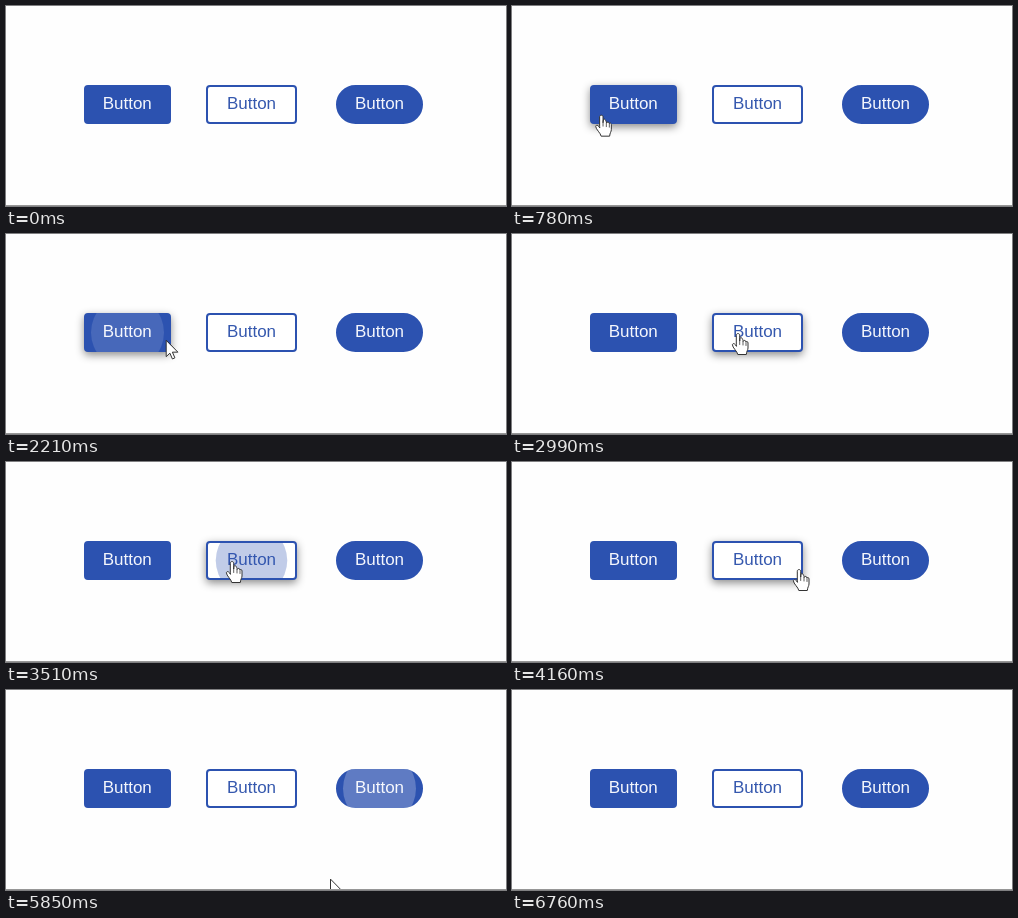
An HTML page for the animation above (7020 ms loop, 500 by 200 pixels).

```html
<!DOCTYPE html>
<html lang="en">
<head>
<meta charset="utf-8">
<title>Buttons</title>
<style>
  html, body { margin: 0; width: 100%; height: 100%; overflow: hidden; background: #fefefe; }
  #stage { position: relative; width: 500px; height: 200px; overflow: hidden; }
  #stage::after {
    content: ""; position: absolute; left: 0; top: 199px; width: 500px; height: 1px; background: #969696;
  }
  .btn {
    position: absolute; top: 79px; height: 38.5px; box-sizing: border-box;
    border: 2px solid #2c52b0; border-radius: 4px; background: #2c52b0; color: #f4f6fc;
    font: 17px/34.5px "Liberation Sans", Arial, sans-serif; text-align: center;
    --ripple: #fff;
  }
  .solid { left: 78px; width: 86.5px; }
  .outline { left: 200px; width: 91px; background: #fff; color: #3558ae; --ripple: #2c52b0; }
  .pill { left: 330px; width: 87px; border-radius: 20px; }
  .clip { position: absolute; inset: -2px; border-radius: inherit; overflow: hidden; }
  .clip i {
    position: absolute; left: 50%; top: 50%; width: 73px; height: 73px; margin: -36.5px;
    border-radius: 50%; background: var(--ripple); opacity: 0;
  }
  svg { position: absolute; left: 0; top: 0; overflow: visible; }
  svg path { fill: #fff; stroke: #333; stroke-linejoin: round; stroke-linecap: round; }
</style>
</head>
<body>
<div id="stage">
  <div class="btn solid">Button<span class="clip"><i></i></span></div>
  <div class="btn outline">Button<span class="clip"><i></i></span></div>
  <div class="btn pill">Button<span class="clip"><i></i></span></div>
  <svg id="cursor" width="20" height="24">
    <g id="hand">
      <path d="M-1.7 10.5V1.2C-1.7-1 1.7-1 1.7 1.2V7C2-.2 5.2 5.4 5.2 7.4C5.6 5.8 8 6.2 8 8C8.6 7 10 7.4 10 9V14C10 16 8.6 17 8.3 20.5H-.2C-.6 17.5-5.6 13.6-5.6 10.8C-5.4 9-3.2 9-1.7 12Z"/>
      <path d="M1.7 7V10.5M5 7.5V11M8 8.5V11.5" fill="none" stroke-width=".8"/>
    </g>
    <path id="arrow" d="M.5.5V16.5L4.2 13L6.7 18.8L9.2 17.7L6.7 12H11.8Z" stroke="#1d2a5c"/>
  </svg>
</div>
<script>
const LOOP = 7020, STEP = 130, RIPPLE = 550, FADE = 250;

// Hover span, press time and release time of each button, in ms.
const spans = [
  { enter: 390, leave: 2200, press: 1600, release: 2000 },
  { enter: 2440, leave: 4240, press: 3060, release: 3500 },
  { enter: 4400, leave: 5560, press: 4840, release: 5720 }
];

// Pointer path: time, x, y.
const path = [
  [240, 82, 200], [520, 88, 115], [910, 90, 107], [2040, 90, 107],
  [2240, 172, 106], [2440, 206, 104], [2730, 226, 100], [3700, 226, 100],
  [4030, 285, 107], [4160, 287, 108], [4300, 310, 108], [4420, 338, 106],
  [4680, 359, 103], [5420, 359, 103], [5590, 345, 124], [5850, 324, 189], [5950, 318, 206]
];

const $ = id => document.getElementById(id);
const buttons = [...document.querySelectorAll(".btn")];
const clamp = v => Math.max(0, Math.min(1, v));

// cubic-bezier(.4, 0, .2, 1)
function ease(x) {
  let lo = 0, hi = 1, s = 0.5;
  for (let i = 0; i < 16; i++) {
    s = (lo + hi) / 2;
    const r = 1 - s;
    if (1.2 * r * r * s + 0.6 * r * s * s + s ** 3 < x) lo = s;
    else hi = s;
  }
  return 3 * (1 - s) * s * s + s ** 3;
}

const ramp = (t, start, length) => ease(clamp((t - start) / length));

function drawButton(el, { enter, leave, press, release }, t) {
  const lift = ramp(t, enter, FADE) - ramp(t, leave, FADE);
  el.style.boxShadow = `0 3px 9px rgba(0,0,0,${(0.45 * lift).toFixed(3)})`;
  const grow = ramp(t, press, RIPPLE);
  const alpha = t < press ? 0 : (0.1 + 0.2 * grow) * (1 - ramp(t, release, RIPPLE));
  const ripple = el.querySelector("i");
  ripple.style.transform = `scale(${grow})`;
  ripple.style.opacity = alpha;
}

function drawCursor(t) {
  const next = path.findIndex(p => p[0] > t);
  $("cursor").style.display = next > 0 ? "" : "none";
  if (next < 1) return;
  const [t0, x0, y0] = path[next - 1], [t1, x1, y1] = path[next];
  const k = (t - t0) / (t1 - t0);
  $("cursor").style.transform = `translate(${x0 + (x1 - x0) * k}px, ${y0 + (y1 - y0) * k}px)`;
  const over = spans.some(s => t >= s.enter && t < s.leave);
  $("hand").style.display = over ? "" : "none";
  $("arrow").style.display = over ? "none" : "";
}

function frame() {
  const t = Math.floor(performance.now() % LOOP / STEP) * STEP;
  buttons.forEach((el, i) => drawButton(el, spans[i], t));
  drawCursor(t);
  requestAnimationFrame(frame);
}
frame();
</script>
</body>
</html>
```
